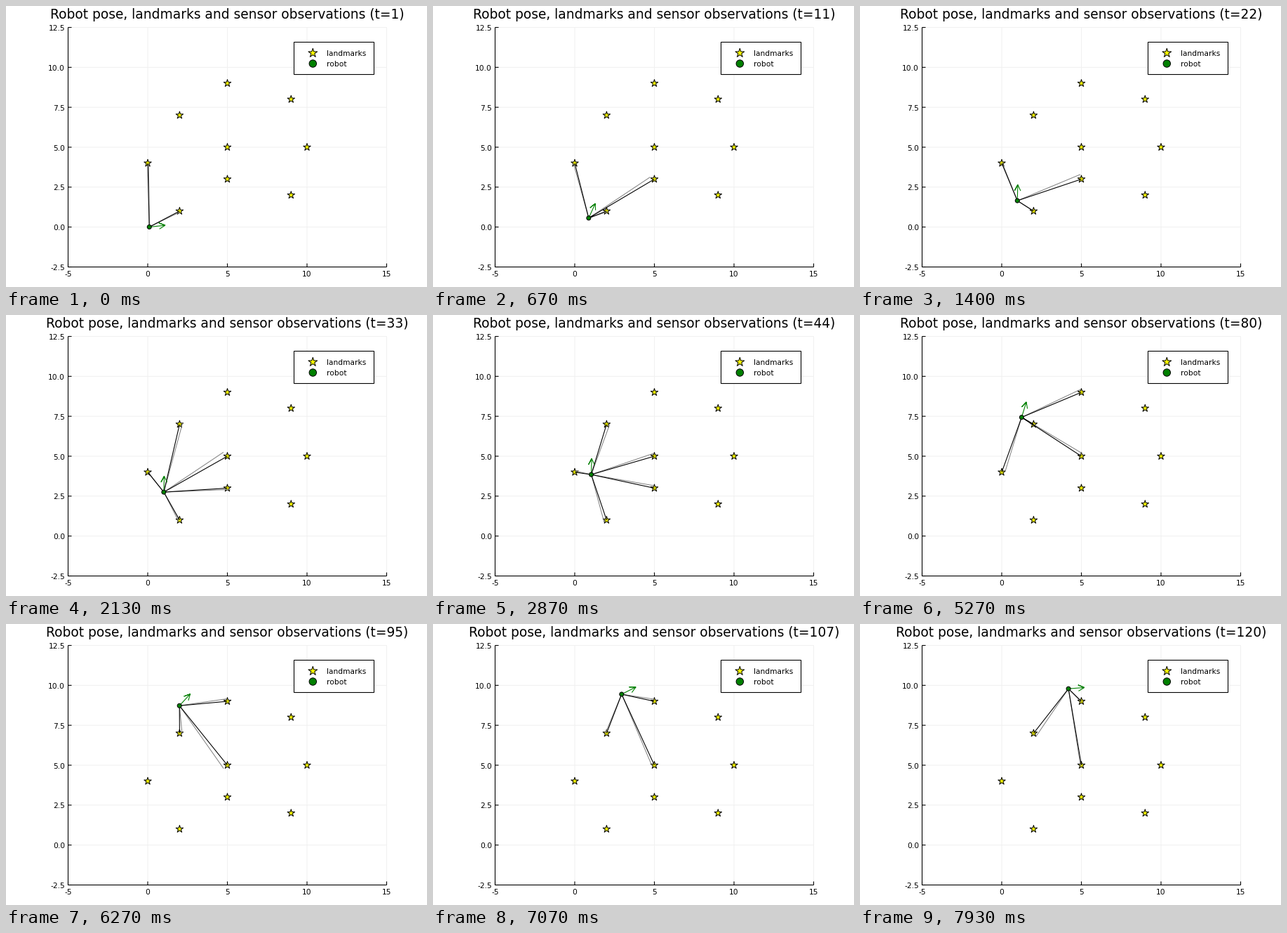
A matplotlib script that plays this animation: 600x400 px, repeating every 8000 ms.

```python
import numpy as np
import matplotlib.pyplot as plt
from matplotlib.animation import FuncAnimation
from matplotlib.patches import Circle, PathPatch, Rectangle
from matplotlib.path import Path

W, H, DPI = 600, 400, 100
STEPS, LOOP_MS, TICK_MS = 120, 8000, 20
PX = 72 / DPI  # points per pixel
LEFT, RIGHT, TOP, BOTTOM = 88.5, 542.5, 30.5, 371.5
SIGHT = 5.0

plt.rcParams["font.family"] = "DejaVu Sans"

LANDMARKS = np.array([(0, 4), (2, 1), (2, 7), (5, 3), (5, 5),
                      (5, 9), (9, 2), (9, 8), (10, 5)], float)


def sx(x):
    return LEFT + (np.asarray(x) + 5) / 20 * (RIGHT - LEFT)


def sy(y):
    return BOTTOM - (np.asarray(y) + 2.5) / 15 * (BOTTOM - TOP)


# Drive: tight left turn, straight ahead, wide right turn
def heading(t):
    return np.minimum(0.104 * t, 1.545) - 0.03 * np.maximum(t - 71, 0)


mid = heading(np.arange(STEPS) + 0.5)
path_x = np.concatenate([[0], np.cumsum(0.1 * np.cos(mid))])
path_y = np.concatenate([[0], np.cumsum(0.1 * np.sin(mid))])

# Sensor noise per step and landmark: bearing, range
noise = np.random.default_rng(4).normal(0, (0.045, 0.07),
                                        (STEPS + 1, len(LANDMARKS), 2))

fig = plt.figure(figsize=(W / DPI, H / DPI), dpi=DPI, facecolor="white")
ax = fig.add_axes([0, 0, 1, 1])
ax.set_xlim(0, W)
ax.set_ylim(H, 0)
ax.axis("off")


def line(xs, ys, color="black", width=1.1, z=3):
    return ax.plot(xs, ys, color=color, lw=width * PX, zorder=z, snap=False,
                   solid_capstyle="butt", solid_joinstyle="miter")[0]


def label(x, y, text, size=10.667, ha="center"):
    return ax.text(x, y, text, fontsize=size * PX, ha=ha, va="baseline",
                   zorder=10)


def star(x, y, radius, z):
    shape = Path.unit_regular_star(5, 0.382)
    points = shape.vertices * (radius, -radius) + (x, y)
    ax.add_patch(PathPatch(Path(points, shape.codes), fc="yellow", ec="black",
                           lw=PX, joinstyle="round", snap=False, zorder=z))


def dot(x, y, radius, z):
    return ax.add_patch(Circle((x, y), radius, fc="green", ec="black",
                               lw=PX, snap=False, zorder=z))


def segments(x0, y0, x1, y1):
    """Separate strokes from each start to each end, as one polyline."""
    x0, y0, x1, y1 = np.broadcast_arrays(x0, y0, x1, y1)
    gap = np.full(x0.shape, np.nan)
    return (np.column_stack([x0, x1, gap]).ravel(),
            np.column_stack([y0, y1, gap]).ravel())


# Grid, ticks and axes
x_values = np.arange(-5, 16, 5)
y_values = np.arange(-2.5, 12.6, 2.5)
xt, yt = sx(x_values), sy(y_values)
line(*segments(xt, TOP, xt, BOTTOM), "#f0f0f0", 1, 1)
line(*segments(LEFT, yt, RIGHT, yt), "#f0f0f0", 1, 1)
line(*segments(xt, BOTTOM, xt, BOTTOM - 5))
line(*segments(LEFT, yt, LEFT + 5, yt))
line([LEFT, LEFT, RIGHT], [TOP, BOTTOM, BOTTOM])
for v, x in zip(x_values, xt):
    label(x, 385, str(v))
for v, y in zip(y_values, yt):
    label(84, y + 4.6, f"{v:.1f}", ha="right")

# Legend
ax.add_patch(Rectangle((410.5, 51.5), 114, 46, fc="white", ec="black",
                       lw=1.1 * PX, snap=False, zorder=8))
star(437.3, 67, 6.7, 9)
dot(437.3, 82, 5.2, 9)
label(457.5, 71, "landmarks", ha="left")
label(457.5, 86, "robot", ha="left")

for x, y in LANDMARKS:
    star(float(sx(x)), float(sy(y)), 5.5, 4)

title = label(315.5, 18, "", 18.667)
measured = line([], [], "gray", 1.0, 5)
actual = line([], [], z=5.5)
arrow = line([], [], "green", z=6)
robot = dot(0, 0, 3, 7)


def draw(i):
    # Steps start on the nearest hundredth of a second
    t = min(int((i * TICK_MS + 15) * STEPS / LOOP_MS) + 1, STEPS)
    x, y, a = path_x[t], path_y[t], heading(t)
    title.set_text("Robot pose, landmarks and sensor observations "
                   f"(t={t})")

    delta = LANDMARKS - (x, y)
    dist = np.hypot(delta[:, 0], delta[:, 1])
    near = dist < SIGHT
    bearing = np.arctan2(delta[:, 1], delta[:, 0]) + noise[t, :, 0]
    reach = dist + noise[t, :, 1]
    px, py = float(sx(x)), float(sy(y))
    actual.set_data(*segments(px, py, sx(LANDMARKS[near, 0]),
                              sy(LANDMARKS[near, 1])))
    measured.set_data(*segments(px, py,
                                sx(x + reach * np.cos(bearing))[near],
                                sy(y + reach * np.sin(bearing))[near]))

    # Open arrow, one unit long
    c, s = np.cos(a), np.sin(a)
    along = np.array([0, 1, 0.62, 1, 0.62])
    side = np.array([0, 0, 0.19, 0, -0.19])
    arrow.set_data(sx(x + along * c - side * s), sy(y + along * s + side * c))
    robot.center = px, py
    return title, measured, actual, arrow, robot


anim = FuncAnimation(fig, draw, frames=LOOP_MS // TICK_MS, interval=TICK_MS,
                     repeat=True, repeat_delay=0, blit=False)
plt.show()
```
